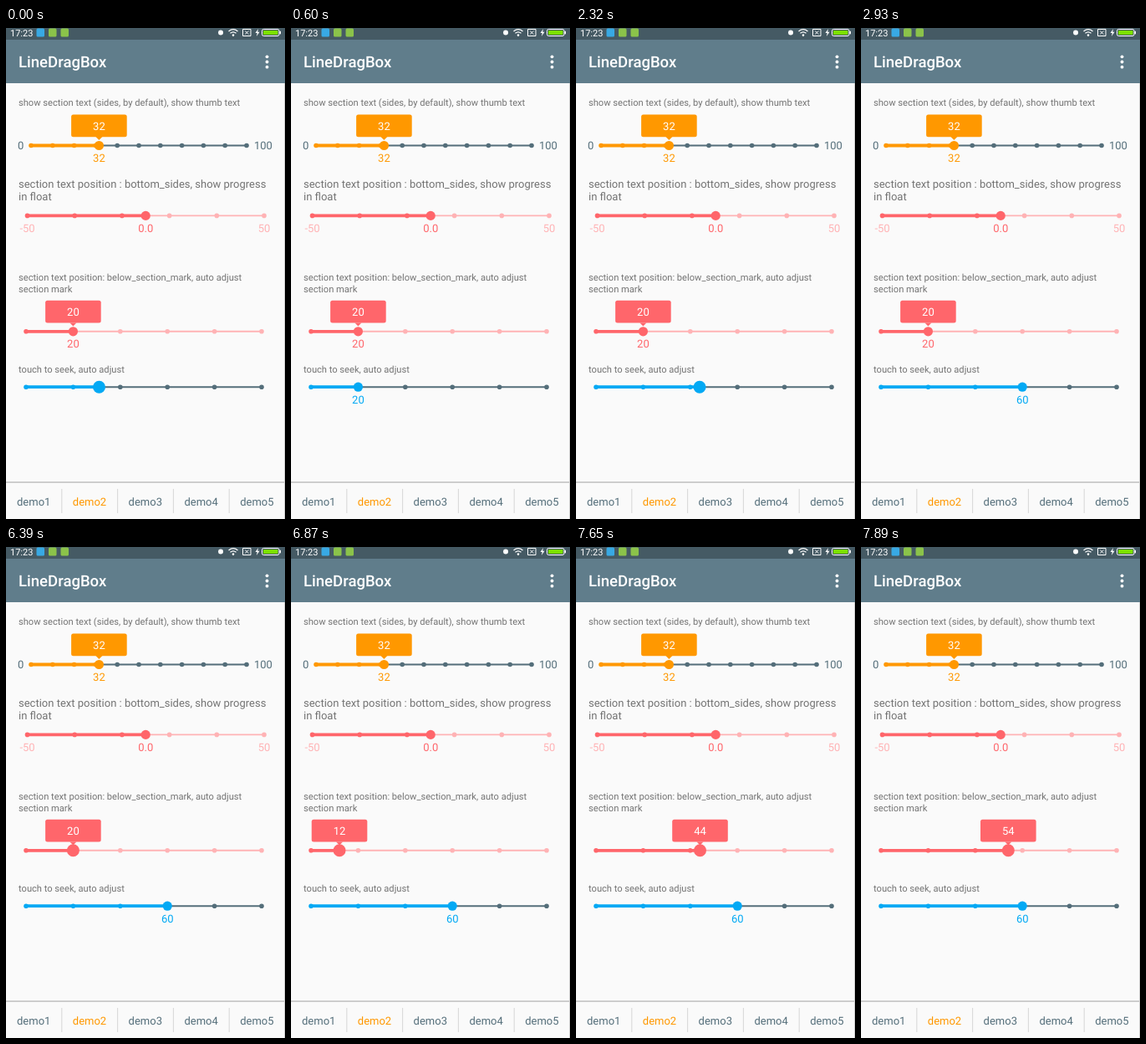
Recreate the animation shown at these times as an HTML page. Size 334 by 587 pixels, loop 8000 ms.

```html
<!DOCTYPE html>
<html lang="en">
<head>
<meta charset="utf-8">
<title>Slider demo</title>
<style>
  html, body { margin: 0; width: 100%; height: 100%; overflow: hidden; background: #fafafa; }
  svg { display: block; width: 100vw; height: 100vh; }
  text { font-family: Roboto, sans-serif; font-size: 13px; text-rendering: geometricPrecision; }
  .note { fill: #737373; }
  .small { font-size: 11.13px; }
  .mid { text-anchor: middle; }
</style>
</head>
<body>
<svg id="stage" viewBox="0 0 334 587" xmlns="http://www.w3.org/2000/svg">
  <rect width="334" height="587" fill="#fafafa"/>
  <rect width="334" height="66" fill="#607d8b"/>
  <rect width="334" height="14" fill="#455a64"/>

  <!-- status bar -->
  <text x="5" y="9.8" fill="#fff" style="font-size:11px">17:23</text>
  <rect x="36.5" y="0.5" width="9.5" height="10" rx="1.5" fill="#38a9e4"/>
  <rect x="51" y="0.5" width="9.5" height="10" rx="1.5" fill="#8bc34a"/>
  <rect x="65.5" y="0.5" width="9.5" height="10" rx="1.5" fill="#8bc34a"/>
  <circle cx="257" cy="5.5" r="3" fill="#fff"/>
  <g fill="none" stroke="#fff" stroke-width="1.2">
    <path d="M266.5 4q5.5-4.6 11 0M268.5 6.3q3.500-3 7 0"/>
    <path d="M283.500 1.500h9.500v8h-9.500zM286.300 3.500l4 4M290.300 3.500l-4 4" stroke-width="1"/>
    <rect x="306.500" y="1.500" width="20.500" height="8" rx="2" stroke-width="1"/>
  </g>
  <circle cx="272" cy="8.600" r="1.300" fill="#fff"/>
  <path d="M302 1l-3.500 5h2.300l-1 4 3.700-5.300h-2.300z" fill="#fff"/>
  <rect x="308" y="3" width="17.500" height="5" rx="0.500" fill="#7be000"/>
  <rect x="327.500" y="3.800" width="1.500" height="3.500" fill="#fff"/>

  <!-- toolbar -->
  <text x="15" y="47" fill="#fff" style="font-size:18.55px;font-weight:500">LineDragBox</text>
  <g fill="#fff">
    <circle cx="312.500" cy="34.300" r="1.900"/>
    <circle cx="312.500" cy="40.500" r="1.900"/>
    <circle cx="312.500" cy="46.700" r="1.900"/>
  </g>

  <g class="note">
    <text class="small" x="15" y="93">show section text (sides, by default), show thumb text</text>
    <text x="15" y="191">section text position : bottom_sides, show progress</text>
    <text x="15" y="206">in float</text>
    <text class="small" x="15" y="302.300">section text position: below_section_mark, auto adjust</text>
    <text class="small" x="15" y="315.500">section mark</text>
    <text class="small" x="15" y="411.500">touch to seek, auto adjust</text>
  </g>
  <g fill="#546e7a">
    <text x="14" y="145.300">0</text>
    <text x="297" y="145.300">100</text>
  </g>
  <g class="mid" fill="#ffb3b5">
    <text x="25.500" y="243.800">-50</text>
    <text x="309" y="243.800">50</text>
  </g>
  <g id="sliders"></g>
  <g id="tabs"></g>
  <rect x="333" y="66" width="1" height="521" fill="#d4d4d4"/>
</svg>
<script>
const NS = 'http://www.w3.org/2000/svg';
const LOOP = 8000;
const PINK = '#ff666b', PALE = '#ffb3b5', SLATE = '#546e7a', ORANGE = '#ff9800', BLUE = '#03a9f4';
const byId = id => document.getElementById(id);

function add(parent, tag, attrs, content) {
  const el = document.createElementNS(NS, tag);
  for (const key in attrs) el.setAttribute(key, attrs[key]);
  if (content !== undefined) el.textContent = content;
  parent.appendChild(el);
  return el;
}

// Builds a slider and returns a function that poses it.
function makeSlider({ x0, x1, y, parts, on, off, bubble }) {
  const g = add(byId('sliders'), 'g', {});
  const line = (color, width) =>
    add(g, 'line', { x1: x0, x2: x1, y1: y, y2: y, stroke: color, 'stroke-width': width });
  line(off, 1.9);
  const fill = line(on, 3.8);
  const marks = [];
  for (let i = 0; i <= parts; i++) {
    const x = x0 + (x1 - x0) * i / parts;
    marks.push({ x, el: add(g, 'circle', { cx: x, cy: y, r: 2.8 }) });
  }
  const thumb = add(g, 'circle', { cy: y, fill: on });
  const label = add(g, 'text', { y: y + 19.4, fill: on, class: 'mid' });
  let sign, value;
  if (bubble) {
    sign = add(g, 'g', {});
    add(sign, 'rect', { x: -33.3, y: y - 37, width: 66.6, height: 26.8, rx: 2.5, fill: on });
    add(sign, 'path', { d: `M-4 ${y - 10.4}h8l-4 4z`, fill: on });
    value = add(sign, 'text', { y: y - 18.6, fill: '#fff', class: 'mid' });
  }
  return (x, held, text) => {
    fill.setAttribute('x2', x);
    thumb.setAttribute('cx', x);
    thumb.setAttribute('r', held ? 7.5 : 5.6);
    for (const m of marks) m.el.setAttribute('fill', m.x <= x ? on : off);
    label.setAttribute('x', x);
    label.textContent = held ? '' : text;
    if (sign) {
      sign.setAttribute('transform', `translate(${x} 0)`);
      value.textContent = text;
    }
  };
}

makeSlider({ x0: 30, x1: 288, y: 140.5, parts: 10, on: ORANGE, off: SLATE, bubble: true })(111.4, false, '32');
makeSlider({ x0: 25.5, x1: 309, y: 224.4, parts: 5, on: PINK, off: PALE })(167.2, false, '0.0');
const row = { x0: 24, x1: 306, parts: 5 };
const posePink = makeSlider({ ...row, y: 362.8, on: PINK, off: PALE, bubble: true });
const poseBlue = makeSlider({ ...row, y: 429.2, on: BLUE, off: SLATE });

const tabs = byId('tabs');
add(tabs, 'rect', { y: 542.3, width: 334, height: 1.6, fill: '#c4c4c4' });
for (let i = 0; i < 5; i++) {
  const x = 66.8 * i;
  if (i) add(tabs, 'rect', { x: x - 0.5, y: 551, width: 1, height: 29, fill: '#d6d6d6' });
  add(tabs, 'text', { x: x + 33.2, y: 570.7, class: 'mid', fill: i === 1 ? ORANGE : SLATE }, 'demo' + (i + 1));
}

// Touch samples: [time, thumb x, finger down]
const blueDrag = [
  [0, 111.5, 1], [120, 115.3, 1], [240, 108, 1], [360, 97, 1], [480, 85, 1], [600, 80.4, 0],
  [1350, 96.5, 1], [1590, 106, 1], [1710, 119, 1], [1830, 128, 1], [1950, 133, 1],
  [2200, 137, 1], [2320, 148, 1], [2440, 160, 1], [2570, 173, 1], [2690, 184, 1],
  [2810, 191, 1], [2930, 193.2, 0]
];
const pinkDrag = [
  [0, 80.4, 0], [6390, 80.4, 1], [6510, 66, 1], [6640, 53.5, 1], [6870, 58, 1],
  [6990, 70, 1], [7100, 82, 1], [7210, 95, 1], [7320, 107.6, 1], [7420, 119, 1],
  [7540, 134, 1], [7650, 148.5, 1], [7770, 163, 1], [7890, 176.3, 1]
];

function play(drag, pose, t) {
  let now = drag[0];
  for (const sample of drag) if (sample[0] <= t) now = sample;
  const [, x, held] = now;
  pose(x, held, String(Math.round((x - row.x0) / (row.x1 - row.x0) * 100)));
}

function render(t) {
  play(pinkDrag, posePink, t);
  play(blueDrag, poseBlue, t);
}

let start;
function tick(now) {
  if (start === undefined) start = now;
  render((now - start) % LOOP);
  requestAnimationFrame(tick);
}
render(0);
requestAnimationFrame(tick);
</script>
</body>
</html>
```
